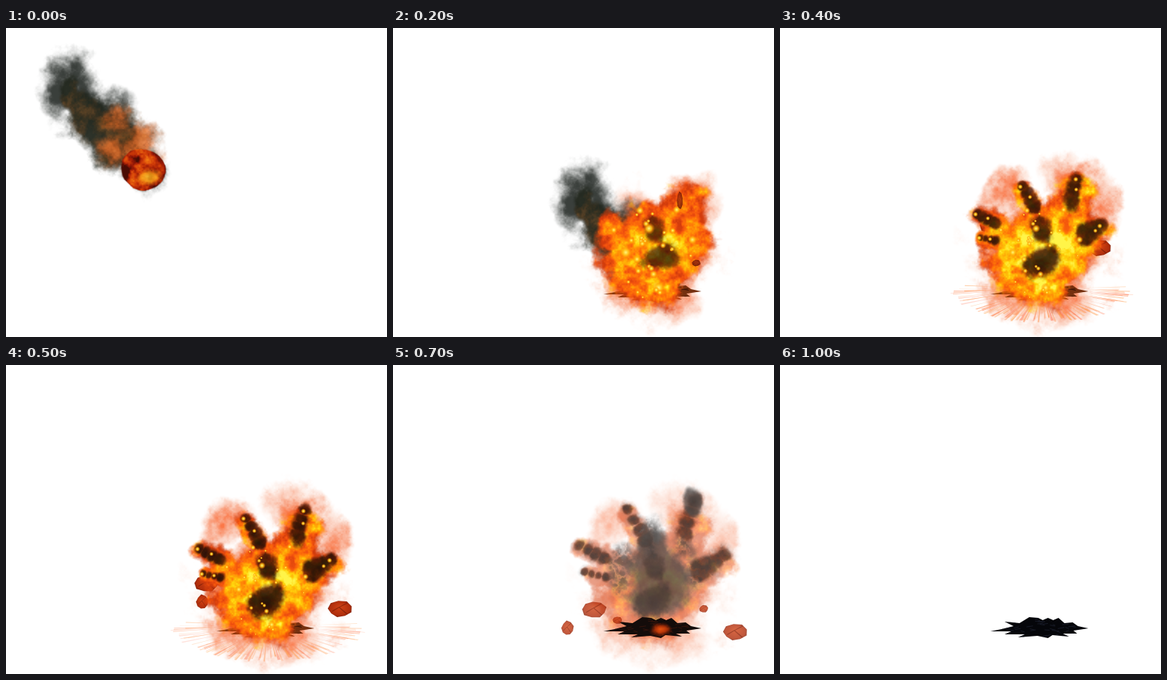
Recreate the animation shown at these times as an HTML page with a canvas. Size 509 by 413 pixels, loop 1100 ms.

```html
<!DOCTYPE html>
<html lang="en">
<head>
<meta charset="utf-8">
<title>Meteor impact</title>
<style>
html, body { margin: 0; width: 100%; height: 100%; overflow: hidden; background: #fff; }
canvas { display: block; width: 509px; height: 413px; }
</style>
</head>
<body>
<canvas id="stage" width="509" height="413"></canvas>
<script>
const W = 509, H = 413, TILE = 256, STEP = 100, COUNT = 11;
const lerp = (a, b, t) => a + (b - a) * t;
const clamp = v => v < 0 ? 0 : v > 1 ? 1 : v;
const smooth = v => v * v * (3 - 2 * v);

function random(seed) {
  return () => {
    seed = (seed + 0x6D2B79F5) | 0;
    let t = Math.imul(seed ^ (seed >>> 15), 1 | seed);
    t = (t + Math.imul(t ^ (t >>> 7), 61 | t)) ^ t;
    return ((t ^ (t >>> 14)) >>> 0) / 4294967296;
  };
}

// Tiling fractal noise, mean 0.5 and deviation 0.2
function makeNoise(seed, cell) {
  const out = new Float32Array(TILE * TILE);
  let amp = 1;
  for (let c = cell; c >= 2; c >>= 1, amp *= 0.6) {
    const n = TILE / c, grid = Float32Array.from({ length: n * n }, random(seed + c));
    for (let y = 0; y < TILE; y++) {
      const gy = y / c | 0, r0 = gy * n, r1 = (gy + 1) % n * n, fy = smooth(y / c - gy);
      for (let x = 0; x < TILE; x++) {
        const gx = x / c | 0, nx = (gx + 1) % n, fx = smooth(x / c - gx);
        out[y * TILE + x] += amp * lerp(
          lerp(grid[r0 + gx], grid[r0 + nx], fx),
          lerp(grid[r1 + gx], grid[r1 + nx], fx), fy);
      }
    }
  }
  let sum = 0, sq = 0;
  for (const v of out) { sum += v; sq += v * v; }
  const mean = sum / out.length, dev = Math.sqrt(sq / out.length - mean * mean);
  return out.map(v => clamp(0.5 + (v - mean) / dev * 0.2));
}
const edgeNoise = makeNoise(11, 32), fineNoise = makeNoise(57, 16);

function makeRamp(...stops) {
  const rgb = stops.map(s => [1, 3, 5].map(i => parseInt(s.slice(i, i + 2), 16)));
  return Array.from({ length: 256 }, (_, i) => {
    const p = i / 255 * (rgb.length - 1), k = Math.min(p | 0, rgb.length - 2);
    return rgb[k].map((v, j) => lerp(v, rgb[k + 1][j], p - k));
  });
}
const RAMP = {
  trail: makeRamp('#626562', '#444945', '#252a26'),
  body: makeRamp('#23281f', '#38301f', '#5c4224', '#8a5020'),
  ember: makeRamp('#553818', '#a04c1c', '#d86828', '#ee8038'),
  head: makeRamp('#4a0c04', '#9c1a06', '#d03c08', '#ee7010', '#ffb41c'),
  hot: makeRamp('#ec7010', '#ffa818', '#ffd83a'),
  glow: makeRamp('#fde3d8', '#fac6b2', '#f8926c', '#fa6028'),
  fire: makeRamp('#d23c0c', '#f2520e', '#ff7508', '#ffa206', '#ffd40c', '#fff448'),
  soot: makeRamp('#7c2806', '#481606', '#260e06', '#140a08'),
  smoke: makeRamp('#686462', '#4c4846', '#3e3a39')
};

const layer = document.createElement('canvas');
layer.width = W;
layer.height = H;
const layerCtx = layer.getContext('2d');

// Blob: [x, y, rx, ry = rx, strength = 1]
function cloud(c, blobs, o) {
  const { ramp, amp = 0.6, soft = 0.4, alpha = 1, gain = 1, bias = 0, tex = 0.5,
          dx = 0, dy = 0, shift = 0, wisp = 0 } = o;
  if (alpha <= 0) return;
  const list = blobs.map(([x, y, rx, ry = rx, k = 1]) => [x + dx, y + dy, rx, ry, k]);
  const pad = 1 + amp / 2;
  const bound = (pos, rad, sign, lim) => {
    const v = list.map(b => b[pos] + sign * b[rad] * pad / Math.min(1, b[4]));
    return sign < 0 ? Math.max(0, Math.floor(Math.min(...v)))
                    : Math.min(lim, Math.ceil(Math.max(...v)));
  };
  const x0 = bound(0, 2, -1, W), x1 = bound(0, 2, 1, W);
  const y0 = bound(1, 3, -1, H), y1 = bound(1, 3, 1, H);
  if (x1 <= x0 || y1 <= y0) return;
  const img = layerCtx.createImageData(x1 - x0, y1 - y0), px = img.data;
  let p = 0;
  for (let y = y0; y < y1; y++) {
    for (let x = x0; x < x1; x++, p += 4) {
      let f = -9;
      for (const b of list) {
        const u = (x - b[0]) / b[2], v = (y - b[1]) / b[3];
        const g = b[4] * (1 - Math.sqrt(u * u + v * v));
        if (g > f) f = g;
      }
      if (f < -amp / 2) continue;
      const i = ((y - dy + shift) & 255) * TILE + ((x - dx + shift * 3) & 255);
      const d = f + (edgeNoise[i] - 0.5) * amp;
      if (d <= 0) continue;
      const n = fineNoise[i];
      let a = smooth(Math.min(1, d / soft)) * alpha;
      if (wisp) a *= 1 - wisp + wisp * Math.min(1, Math.abs(n - 0.5) * 4.5);
      const col = ramp[clamp(d * gain + bias + (n - 0.5) * tex) * 255 | 0];
      px[p] = col[0];
      px[p + 1] = col[1];
      px[p + 2] = col[2];
      px[p + 3] = a * 255;
    }
  }
  layerCtx.clearRect(0, 0, W, H);
  layerCtx.putImageData(img, x0, y0);
  c.drawImage(layer, 0, 0);
}

function chain(x0, y0, r0, x1, y1, r1, n, k = 1) {
  return Array.from({ length: n }, (_, i) => {
    const t = i / (n - 1), r = lerp(r0, r1, t);
    return [lerp(x0, x1, t), lerp(y0, y1, t), r, r, k];
  });
}

function meteor(c, dx, dy) {
  const put = (blobs, o) => cloud(c, blobs, { dx, dy, ...o });
  put([[76, 62, 40, 42], [70, 88, 34, 40], [100, 88, 48, 42], ...chain(120, 112, 50, 182, 184, 36, 5)],
    { ramp: RAMP.trail, amp: 0.9, soft: 0.95, alpha: 0.9, gain: 1.2 });
  put([[84, 86, 14, 26], ...chain(98, 100, 20, 126, 134, 42, 3), [148, 156, 45], [176, 182, 36]],
    { ramp: RAMP.body, amp: 0.5, soft: 0.45, alpha: 0.95, gain: 0.5, bias: -0.05, tex: 1.1 });
  put([[148, 128, 28], [140, 155, 30], [172, 154, 36], [190, 178, 25]],
    { ramp: RAMP.ember, amp: 0.9, soft: 0.8, alpha: 0.85, gain: 0.5, bias: 0.2, tex: 1, shift: 20 });
  put([[182, 188, 31, 29]],
    { ramp: RAMP.head, amp: 0.14, soft: 0.08, gain: 0.55, bias: 0.15, tex: 1 });
  put([[189, 198, 18, 12]],
    { ramp: RAMP.hot, amp: 0.8, soft: 0.8, alpha: 0.8, gain: 0.9 });
}

// Base x, y, tip x, y, radius
const PLUMES = [
  [386, 238, 400, 192, 17],
  [343, 248, 318, 202, 11],
  [292, 264, 256, 244, 11],
  [402, 282, 436, 259, 15],
  [292, 286, 262, 278, 9]
];
const tip = ([x, y, tx, ty], reach) => [lerp(x, tx, reach), lerp(y, ty, reach)];

function glow(c, s) {
  const g = s.grow, out = lerp(390, 384, g);
  cloud(c, [
    [350, 302, lerp(96, 104, g), lerp(98, 104, g)],
    [350, 352, lerp(78, 100, g), lerp(48, 54, g)],
    [out, lerp(236, 196, g), 47], [lerp(325, 290, g), lerp(245, 212, g), 41],
    [lerp(410, 434, g), 236, 34, 46]
  ], { ramp: RAMP.glow, amp: 0.5, soft: 0.32, alpha: s.glow, gain: 1.15, bias: -0.1, tex: 0.7, shift: 40 });
}

function fire(c, s) {
  const [alpha, gain, bias] = s.fire, g = s.grow;
  const arms = PLUMES.flatMap(p => {
    const [tx, ty] = tip(p, s.reach * 0.9);
    return chain(p[0], p[1], p[4] * 2.3, tx, ty, p[4] * 1.5, 4, 0.6);
  });
  cloud(c, [[346, 300, lerp(76, 80, g), lerp(75, 72, g)], [372, 278, 62, 58, 0.9],
            [346, 335, 58, 36, 0.8], ...arms],
    { ramp: RAMP.fire, amp: 0.5, soft: 0.3, alpha, gain, bias, tex: 0.95, shift: 70 });
}

function soot(c, s) {
  const g = s.grow;
  const arms = PLUMES.flatMap(p => {
    const [tx, ty] = tip(p, s.reach);
    return chain(lerp(p[0], tx, 0.25), lerp(p[1], ty, 0.25), p[4] * 1.05, tx, ty, p[4] * 0.85, 4);
  });
  const core = [[347, 272, 17, 21], [lerp(356, 348, g), lerp(305, 314, g), 27, lerp(20, 28, g)]];
  if (g < 0.7) core.push([368, 309, 18, 16]);
  if (s.reach > 0.4) cloud(c, arms,
    { ramp: RAMP.soot, amp: 0.7, soft: 0.45, alpha: s.soot, gain: 0.7, bias: 0.1, tex: 0.8, shift: 90 });
  cloud(c, core,
    { ramp: RAMP.soot, amp: 0.8, soft: 0.5, alpha: s.soot, gain: 0.8, bias: 0.1, tex: 0.7, shift: 130 });
}

function spark(c, x, y, r) {
  const g = c.createRadialGradient(x, y, 0, x, y, r);
  g.addColorStop(0, '#fff67c');
  g.addColorStop(0.45, 'rgba(255,190,20,.9)');
  g.addColorStop(1, 'rgba(255,110,0,0)');
  c.fillStyle = g;
  c.fillRect(x - r, y - r, 2 * r, 2 * r);
}

function sparks(c, s) {
  const spots = [[342, 268, 8], [330, 244, 6], [295, 270, 5], [311, 300, 9],
                 [355, 347, 9], [400, 283, 7], [379, 243, 6], [326, 309, 6], [348, 329, 6]];
  const size = lerp(1, 0.6, s.grow), rand = random(5);
  for (const [x, y, r] of spots) spark(c, x, y, r * size);
  for (let i = 0; i < 24; i++) {
    const a = rand() * 6.283, r = 15 + rand() * 48;
    spark(c, 345 + Math.cos(a) * r, 298 + Math.sin(a) * r, (2 + rand() * 3) * size);
  }
  if (s.reach > 0.4) for (const p of PLUMES) {
    const [x, y] = tip(p, s.reach);
    spark(c, x - 2, y + 1, 3.5);
    spark(c, lerp(x, p[0], 0.4) + 3, lerp(y, p[1], 0.4), 3);
  }
}

function rays(c, power, rx, ry) {
  const rand = random(21);
  for (let i = 0; i < 96; i++) {
    const a = -0.22 + rand() * 3.58, far = 0.8 + rand() * 0.2, spread = 0.006 + rand() * 0.012;
    const at = (q, k) => [350 + Math.cos(q) * rx * k, 348 + Math.sin(q) * ry * k];
    c.fillStyle = `rgba(255,${110 + rand() * 60 | 0},80,${power * (0.4 + rand() * 0.6)})`;
    c.beginPath();
    c.moveTo(...at(a, 0.5));
    c.lineTo(...at(a - spread, far));
    c.lineTo(...at(a + spread, far));
    c.fill();
  }
}

function rock(c, x, y, w, h, seed, alpha, col) {
  const rand = random(seed);
  c.save();
  c.globalAlpha = alpha;
  c.translate(x, y);
  c.scale(w / 2, h / 2);
  c.rotate(-0.3);
  c.beginPath();
  for (let i = 0; i < 9; i++) {
    const a = i / 9 * 6.283, r = 0.86 + rand() * 0.2;
    c.lineTo(Math.cos(a) * r, Math.sin(a) * r);
  }
  c.closePath();
  const g = c.createRadialGradient(0.1, -0.2, 0.1, 0, 0, 1.1);
  g.addColorStop(0, col[0]);
  g.addColorStop(0.7, col[1]);
  g.addColorStop(1, col[2]);
  c.fillStyle = g;
  c.fill();
  c.clip();
  c.strokeStyle = 'rgba(70,12,4,.4)';
  c.lineWidth = 0.09;
  c.beginPath();
  c.moveTo(-0.7, 0.1);
  c.lineTo(0, -0.2);
  c.lineTo(0.4, 0.8);
  c.moveTo(0, -0.2);
  c.lineTo(0.8, -0.5);
  c.stroke();
  c.restore();
}

// First step, width, height, then the places until it rests
const ROCKS = [
  [3, 34, 24, [300, 238], [283, 264], [268, 292], [269, 327]],
  [4, 17, 20, [288, 284], [262, 317], [233, 352]],
  [4, 33, 23, [426, 294], [446, 326], [457, 357]],
  [6, 13, 10, [415, 312], [415, 326]],
  [7, 14, 10, [300, 341]]
];
function rocks(c, step, alpha) {
  const col = step < 4 ? ['#a83010', '#7c1c08', '#3c0c04'] : ['#cc4014', '#b02e0c', '#701804'];
  ROCKS.forEach(([from, w, h, ...path], i) => {
    if (step < from) return;
    const [x, y] = path[Math.min(step - from, path.length - 1)];
    rock(c, x, y, w, h, i + 3, alpha, col);
  });
}

const CRATER = [
  [281, 356], [296, 353], [312, 349], [300, 343], [320, 345], [333, 337], [345, 338], [351, 341],
  [358, 338], [365, 341], [372, 338], [380, 345], [391, 344], [398, 349], [412, 352], [392, 355],
  [397, 359], [378, 359], [386, 363], [364, 361], [358, 365], [344, 362], [318, 364], [327, 360],
  [300, 360], [309, 356]
];
function crater(c, base, vein, heat) {
  const rand = random(9);
  c.save();
  c.beginPath();
  for (const p of CRATER) c.lineTo(...p);
  c.closePath();
  c.fillStyle = base;
  c.fill();
  c.clip();
  c.strokeStyle = vein;
  for (let i = 0; i < 45; i++) {
    const x = 290 + rand() * 110, y = 338 + rand() * 26;
    c.beginPath();
    c.moveTo(x, y);
    c.lineTo(x + 3 + rand() * 7, y - 2 + rand() * 4);
    c.stroke();
  }
  if (heat) cloud(c, [[357, 353, 16, 10]],
    { ramp: makeRamp('#6a1606', '#b43408', '#e05010'), amp: 0.6, soft: 0.7, alpha: heat });
  c.restore();
}

function smoke(c, s) {
  const [alpha, wide] = s.smoke;
  const arms = PLUMES.flatMap(p => {
    const [x, y] = tip(p, s.reach);
    return chain(p[0], p[1], p[4] * 1.5, x, y, p[4] * wide, 5);
  });
  arms.push([305, 258, 28], [300, 285, 26], [345, 225, 24]);
  cloud(c, arms,
    { ramp: RAMP.smoke, amp: 0.8, soft: 0.9, alpha: alpha * 0.85, gain: 0.8, wisp: 0.6, shift: 90 });
  cloud(c, [[400, 183, 17, 24], [347, 243, 25, 28], [352, 283, 50, 50], [354, 306, 48, 38]],
    { ramp: RAMP.smoke, amp: 0.4, soft: 0.42, alpha, gain: 0.6, bias: 0.2, tex: 0.3, shift: 130 });
}

// Phases of the blast; fire is [alpha, gain, bias], rays [alpha, rx, ry], smoke [alpha, width]
const BLAST = {
  2: { grow: 0, reach: 0.2, glow: 0.85, fire: [1, 0.5, 0.16], soot: 0.72 },
  3: { grow: 0.45, reach: 0.6, glow: 0.9, fire: [1, 0.75, 0.24], soot: 0.8, rays: [0.6, 114, 44] },
  4: { grow: 0.75, reach: 0.8, glow: 0.9, fire: [1, 0.72, 0.24], soot: 0.85, rays: [0.6, 124, 47] },
  5: { grow: 1, reach: 0.95, glow: 0.85, fire: [1, 0.66, 0.16], soot: 0.9, rays: [0.45, 132, 50] },
  6: { grow: 1, reach: 1.05, glow: 0.65, fire: [1, 0.52, 0.04], soot: 0.97 },
  7: { grow: 1, reach: 1.2, glow: 0.45, fire: [0.5, 0.4, 0], soot: 0.6, smoke: [0.75, 1.25], rock: 0.8 },
  8: { grow: 1, reach: 1.38, glow: 0.22, fire: [0.06, 0.3, 0], soot: 0, smoke: [0.92, 1.5], rock: 0.55 },
  9: { grow: 1, reach: 1.5, glow: 0.08, fire: [0, 0, 0], soot: 0, smoke: [0.45, 1.6], rock: 0.25 }
};

function paint(c, step) {
  c.fillStyle = '#fff';
  c.fillRect(0, 0, W, H);
  const s = BLAST[step];
  if (s) glow(c, s);
  if (step < 3) meteor(c, step * 85, step * 74.5 | 0);
  if (step === 10) crater(c, '#05060a', '#171a26', 0);
  if (!s) return;
  if (s.rays) rays(c, ...s.rays);
  if (step < 7) crater(c, '#74300f', '#3a1406', 0);
  if (step > 3 && step < 7) rocks(c, step, 1);
  fire(c, s);
  soot(c, s);
  if (step < 7) sparks(c, s);
  if (step === 2) {
    rock(c, 383, 231, 8, 24, 31, 0.9, ['#b83c10', '#8a2408', '#4a1004']);
    rock(c, 405, 314, 12, 9, 32, 0.9, ['#a03010', '#7c1c08', '#3c0c04']);
  }
  if (step === 3) rocks(c, step, 1);
  if (s.smoke) {
    smoke(c, s);
    crater(c, step < 9 ? '#140c0a' : '#0b090a', step < 9 ? '#34140c' : '#1e1618', 1 - (step - 7) * 0.3);
    rocks(c, step, s.rock);
  }
}

const ctx = document.getElementById('stage').getContext('2d');
const cache = [];
function picture(step) {
  if (!cache[step]) {
    const cv = document.createElement('canvas');
    cv.width = W;
    cv.height = H;
    paint(cv.getContext('2d'), step);
    cache[step] = cv;
  }
  return cache[step];
}

let shown = -1;
const start = performance.now();
function tick() {
  const step = Math.floor((performance.now() - start) / STEP) % COUNT;
  if (step !== shown) {
    ctx.drawImage(picture(step), 0, 0);
    shown = step;
  }
  requestAnimationFrame(tick);
}
tick();
</script>
</body>
</html>
```
